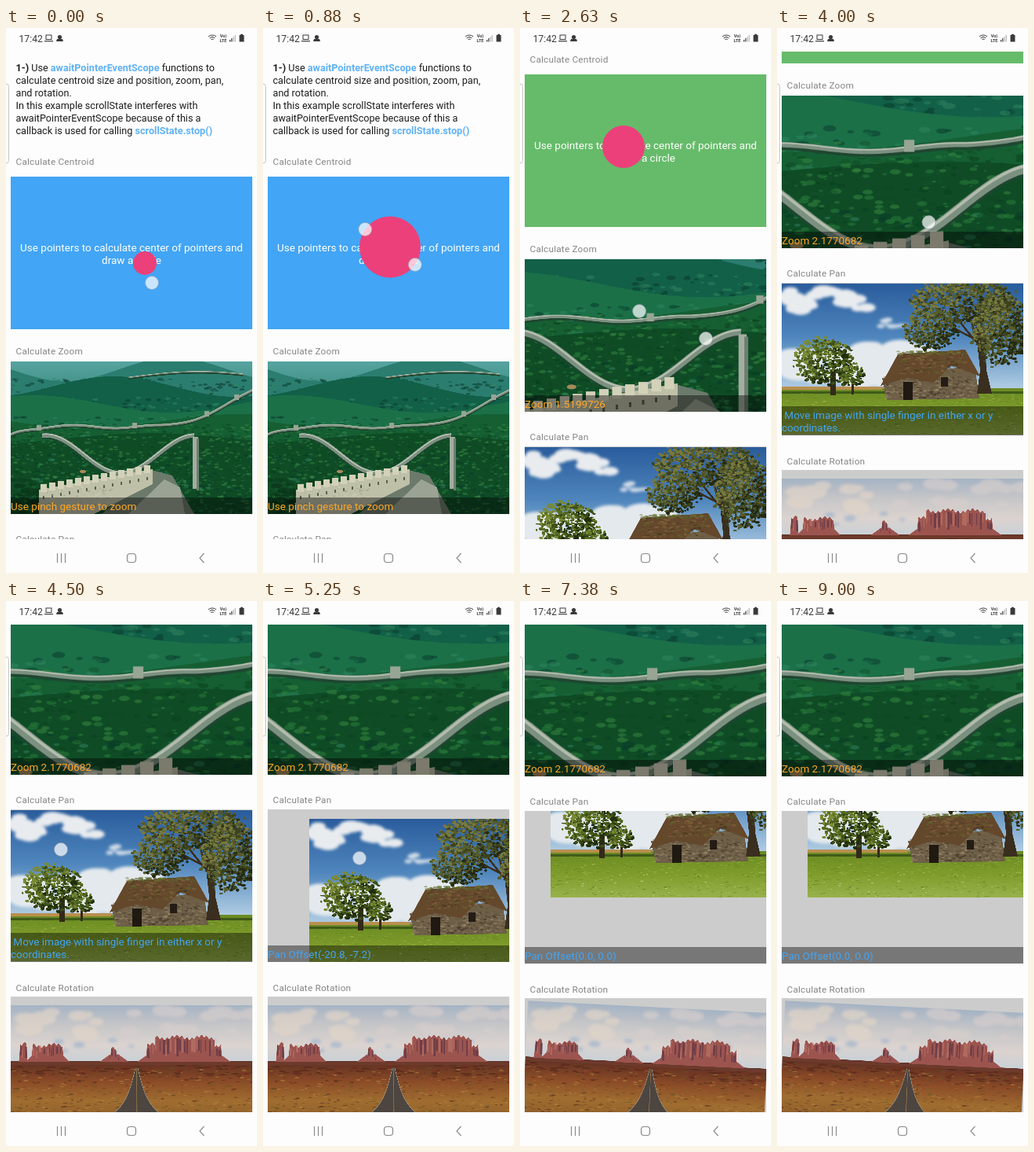
Recreate the animation shown at these times as an HTML page with a canvas. Size 320 px wide and 693 px high, loop 9120 ms.

```html
<!DOCTYPE html>
<html lang="en">
<head>
<meta charset="utf-8">
<title>Pointer gestures</title>
<style>
  html, body { margin: 0; width: 100%; height: 100%; overflow: hidden; background: #fdfdfd; }
  canvas { display: block; width: 320px; height: 693px; }
</style>
</head>
<body>
<canvas id="stage"></canvas>
<script>
const LOOP = 9120, STEP = 125;
const LEFT = 6, W = 308, H = 194;
const DETAIL = 3;
const font = (size, weight = 400) => `${weight} ${size}px Roboto, sans-serif`;
const INTRO = font(12.65), LINK = font(12.65, 700), BODY = font(13.53), LABEL = font(11.8);

const canvas = document.getElementById('stage');
const dpr = window.devicePixelRatio || 1;
canvas.width = 320 * dpr;
canvas.height = 693 * dpr;
const ctx = canvas.getContext('2d');

// ---------- helpers ----------
let seed = 7;
function rnd(min = 0, max = 1) {
  seed = (seed * 1664525 + 1013904223) >>> 0;
  return min + (max - min) * seed / 4294967296;
}

const clamp = v => Math.min(1, Math.max(0, v));
const ramp = (t, from, to) => clamp((t - from) / (to - from));

function picture(h, paint) {
  const c = document.createElement('canvas');
  c.width = W * DETAIL;
  c.height = h * DETAIL;
  const g = c.getContext('2d');
  g.scale(DETAIL, DETAIL);
  paint(g);
  return c;
}

function gradient(g, y0, y1, ...colors) {
  const fill = g.createLinearGradient(0, y0, 0, y1);
  colors.forEach((c, i) => fill.addColorStop(i / (colors.length - 1), c));
  g.fillStyle = fill;
  g.fillRect(0, y0, W, y1 - y0);
}

function rect(g, color, x, y, w, h) {
  g.fillStyle = color;
  g.fillRect(x, y, w, h);
}

function poly(g, color, ...p) {
  g.beginPath();
  for (let i = 0; i < p.length; i += 2) g.lineTo(p[i], p[i + 1]);
  g.fillStyle = color;
  g.fill();
}

function oval(g, color, x, y, rx, ry = rx) {
  g.beginPath();
  g.ellipse(x, y, rx, ry, 0, 0, 7);
  g.fillStyle = color;
  g.fill();
}

// Traces y = f(x); with a floor the area below is filled, else a line is drawn.
function graph(g, color, f, x0, x1, { width = 1, floor } = {}) {
  g.beginPath();
  for (let x = x0; x <= x1; x += 1) g.lineTo(x, f(x));
  if (floor === undefined) {
    g.strokeStyle = color;
    g.lineWidth = width;
    g.stroke();
  } else {
    g.lineTo(x1, floor);
    g.lineTo(x0, floor);
    g.fillStyle = color;
    g.fill();
  }
}

function dabs(g, n, colors, size, x, y, w, h, flat = 0.6) {
  g.globalAlpha = 0.5;
  for (let i = 0; i < n; i++) {
    const r = size * rnd(0.3, 1.3);
    oval(g, colors[i % colors.length], x + rnd() * w, y + rnd() * h, r * 1.3, r * flat);
  }
  g.globalAlpha = 1;
}

// Foliage, lit from the upper left.
function crown(g, x, y, rx, ry, colors) {
  for (let i = 0; i < rx * ry * 0.5; i++) {
    const a = rnd(0, 6.283), d = Math.sqrt(rnd()) * rnd(0.85, 1.1);
    const dx = Math.cos(a) * d, dy = Math.sin(a) * d;
    const shade = clamp(0.5 + (dx + dy) * 0.3 + rnd(-0.45, 0.45));
    oval(g, colors[Math.round(shade * (colors.length - 1))], x + dx * rx, y + dy * ry, rnd(1, 3), rnd(0.8, 2.2));
  }
}

function clouds(g, n, color, x, y, w, h) {
  g.save();
  g.filter = `blur(${2 * DETAIL}px)`;
  g.beginPath();
  for (let i = 0; i < n; i++) {
    const cx = x + rnd() * w, cy = y + rnd() * h, r = h * rnd(0.12, 0.3);
    g.moveTo(cx + r * 2, cy);
    g.ellipse(cx, cy, r * 2, r, 0, 0, 6.283);
  }
  g.fillStyle = color;
  g.fill();
  g.restore();
}

// ---------- pictures ----------
const hills = picture(H, g => {
  gradient(g, 0, 70, '#57a3a0', '#2a7f6a');
  const slopes = ['#2b7d70', '#126048', '#1b7048', '#155f33', '#0f4c26'];
  slopes.forEach((color, i) => {
    const ridge = x => 10 + i * 22 + (15 - i * 2) * Math.sin(x / (44 + i * 6) + i * 2.1);
    graph(g, color, ridge, 0, W, { floor: H });
    dabs(g, 420, ['#07382a', '#2f8560', color], 2.4, 0, 22 + i * 24, W, 42 + i * 10);
  });
  dabs(g, 1500, ['#0a3d1c', '#2c7f3c', '#125228', '#3a8a42', '#0d4721'], 2, 0, 80, W, 114);
  dabs(g, 120, ['#082f16', '#0c3a1a'], 5, 0, 150, 110, 44);

  const wall = (f, x0, x1, width) => {
    graph(g, '#1f4630', x => f(x) + 1.2, x0, x1, { width: width + 1 });
    graph(g, '#7c9080', f, x0, x1, { width });
    graph(g, '#b3bdae', x => f(x) - width * 0.3, x0, x1, { width: width * 0.3 });
  };
  const far = x => 21 - 8 * Math.sin((x - 146) / 60);
  const upper = x => 83 + 2 * Math.sin(x / 17) + 10 * Math.exp(-x / 15) - 45 * clamp((x - 190) / 118) ** 1.5;
  const lower = x => 118 + 24 * Math.cos((x - 140) / 95 * Math.PI);
  wall(far, 150, 296, 1.6);
  wall(upper, 0, W, 3);
  wall(lower, 40, 234, 5.5);
  rect(g, '#a3ada0', 232, 96, 7, 66);
  rect(g, '#6c7f70', 237, 98, 3, 66);
  for (const x of [36, 158, 250, 288]) rect(g, '#97a595', x - 3, upper(x) - 5, 6, 7);

  poly(g, '#6c7a6c', 180, 138, 206, 145, 234, 194, 116, 194);
  poly(g, '#9aa394', 196, 150, 216, 160, 222, 194, 150, 194);
  poly(g, '#bfc0a8', 36, 163, 181, 137, 181, 156, 106, 194, 36, 194);
  for (let x = 38; x < 178; x += 11) {
    const y = 163 - (x - 36) * 0.18;
    rect(g, '#d3d2b9', x, y - 7, 8, 10);
    rect(g, '#59634f', x + 3, y + 8, 2, 4);
  }
  dabs(g, 90, ['#8d937c', '#d8d7c2'], 1.2, 40, 160, 90, 30);
  oval(g, '#a58a58', 92, 140, 4, 2);
});

const cottage = picture(H - 2, g => {
  gradient(g, 0, 136, '#2a5c9c', '#4f86bd', '#b4cfe4');
  clouds(g, 26, '#e9ecef', 0, 8, 110, 26);
  clouds(g, 10, '#d5dfe9', 125, 46, 34, 10);
  clouds(g, 40, '#e4e9ed', 0, 76, 180, 46);
  gradient(g, 133, 192, '#6a8a22', '#7f9c2b', '#98b24c');
  rect(g, '#b98f4e', 0, 131, 128, 4);
  rect(g, '#3f5a1a', 0, 137, W, 3);
  dabs(g, 900, ['#587a1c', '#a4bb55', '#74952a', '#8cab3a'], 1.6, 0, 139, W, 53, 0.3);
  dabs(g, 70, ['#eef0d8'], 0.8, 0, 160, W, 32);

  const leaves = ['#7a8a35', '#576b22', '#3d4f18', '#222f0e'];
  rect(g, '#33291a', 62, 112, 7, 30);
  rect(g, '#33291a', 89, 120, 3, 21);
  crown(g, 54, 98, 38, 29, leaves);
  crown(g, 90, 117, 15, 15, leaves);

  poly(g, '#6e5f48', 128, 120, 246, 104, 252, 146, 134, 148);
  dabs(g, 420, ['#3d3224', '#a08f70', '#5b4d39', '#857455'], 1.7, 129, 118, 118, 28);
  rect(g, '#1f1912', 155, 125, 12, 23);
  rect(g, '#241d15', 203, 119, 9, 12);
  poly(g, '#64482c', 126, 130, 148, 90, 234, 84, 253, 118, 216, 104, 194, 126, 160, 120);
  dabs(g, 260, ['#8a6742', '#47331f', '#6f5433', '#5d6428'], 1.8, 150, 88, 84, 26);
  dabs(g, 70, ['#6d7430', '#54602a'], 2, 148, 86, 88, 4);

  poly(g, '#3a2e1f', 247, 55, 258, 55, 261, 110, 268, 140, 249, 140, 253, 110);
  for (let i = -3; i <= 3; i++) {
    g.beginPath();
    g.moveTo(254, 92 - Math.abs(i) * 6);
    g.quadraticCurveTo(254 + i * 9, 62, 254 + i * 17, 22 + Math.abs(i) * 8);
    g.strokeStyle = '#3a2e1f';
    g.lineWidth = 2.5;
    g.stroke();
  }
  const dryLeaves = ['#77793f', '#565c2c', '#3c431f', '#242a13'];
  crown(g, 232, 22, 66, 28, dryLeaves);
  crown(g, 190, 58, 34, 26, dryLeaves);
  crown(g, 279, 58, 36, 46, dryLeaves);
});

const desert = picture(172, g => {
  gradient(g, 0, 76, '#a5b3c4', '#c6c6c8', '#dbd3cf', '#c6d0d8');
  clouds(g, 16, 'rgba(226,212,200,.7)', 0, 8, 130, 30);
  clouds(g, 14, 'rgba(214,206,204,.7)', 140, 6, 168, 28);
  clouds(g, 8, 'rgba(150,175,205,.6)', 30, 44, 260, 14);
  gradient(g, 71, 172, '#5c3023', '#8a4a27', '#a06d30', '#8c5e2a', '#6b4225');
  dabs(g, 900, ['#4a2819', '#b98a40', '#7d4423', '#6a5a28'], 2, 0, 80, W, 92, 0.35);
  dabs(g, 160, ['#7a3420', '#4d2218'], 4, 0, 74, W, 16, 0.25);

  // A flat-topped rock with ragged sides standing on a sloping foot.
  const butte = (x0, x1, top, foot) => {
    const rock = x => {
      const inset = Math.min(x - x0, x1 - x);
      return inset < foot ? 73 - inset * 10 / foot : top + 2 * Math.sin(x / 5) + 1.5 * Math.sin(x);
    };
    graph(g, '#9c544f', rock, x0, x1, { floor: 74 });
    for (let x = x0 + foot; x < x1 - foot; x += rnd(2, 6)) {
      const y = rock(x);
      rect(g, rnd() < 0.6 ? 'rgba(74,44,66,.55)' : 'rgba(198,128,112,.5)', x, y + rnd(0, 6), rnd(1, 3), (66 - y) * rnd(0.5, 0.9));
    }
  };
  butte(10, 22, 49, 2);
  butte(18, 76, 51, 10);
  butte(112, 152, 62, 14);
  butte(126, 136, 53, 2);
  butte(160, 282, 51, 14);
  butte(180, 264, 41, 4);
  rect(g, '#6d3a2c', 0, 72, W, 4);

  const halfWidth = y => {
    const u = (y - 79) / 57;
    return 0.8 + 14 * u + 12 * u ** 4;
  };
  g.beginPath();
  for (let y = 79; y <= 172; y++) g.lineTo(160 - halfWidth(y), y);
  for (let y = 172; y >= 79; y--) g.lineTo(161 + halfWidth(y), y);
  g.fillStyle = '#4c4540';
  g.fill();
  g.strokeStyle = '#a89b8a';
  g.lineWidth = 0.6;
  g.stroke();
  poly(g, '#8f7240', 160.3, 80, 160.7, 80, 162, 172, 160.5, 172);
});

// ---------- screen parts ----------
function text(str, x, y, color, face = BODY, align = 'left') {
  ctx.font = face;
  ctx.letterSpacing = face === LABEL ? '0.2px' : '0px';
  ctx.textAlign = align;
  ctx.fillStyle = color;
  ctx.fillText(str, x, y);
  return x + ctx.measureText(str).width;
}

function line(color, width, ...p) {
  ctx.beginPath();
  for (let i = 0; i < p.length; i += 2) ctx.lineTo(p[i], p[i + 1]);
  ctx.strokeStyle = color;
  ctx.lineWidth = width;
  ctx.stroke();
}

function touch(x, y) {
  oval(ctx, 'rgba(255,255,255,.72)', x, y, 8.5);
  ctx.strokeStyle = 'rgba(150,155,175,.6)';
  ctx.lineWidth = 1;
  ctx.stroke();
}

function touchPair(x, y, r, angle) {
  const dx = r * Math.cos(angle), dy = r * Math.sin(angle);
  touch(x - dx, y - dy);
  touch(x + dx, y + dy);
}

// Clipped panel; paint draws with the origin at the panel's top left.
function panel(y, color, paint) {
  ctx.save();
  ctx.translate(LEFT, y);
  ctx.beginPath();
  ctx.rect(0, 0, W, H);
  ctx.clip();
  rect(ctx, color, 0, 0, W, H);
  paint();
  ctx.restore();
}

function caption(color, ...lines) {
  const h = 5 + 16 * lines.length;
  rect(ctx, 'rgba(0,0,0,.42)', 0, H - h, W, h);
  lines.forEach((str, i) => text(str, 0, H - 5.5 - 16 * (lines.length - 1 - i), color));
}

function intro() {
  const ink = '#1c1c1c', blue = '#5fb2f5';
  let x = text('1-)', 12.5, 54.5, ink, LINK);
  x = text(' Use ', x, 54.5, ink, INTRO);
  x = text('awaitPointerEventScope', x, 54.5, blue, LINK);
  text(' functions to', x, 54.5, ink, INTRO);
  ['calculate centroid size and position, zoom, pan,', 'and rotation.',
   'In this example scrollState interferes with', 'awaitPointerEventScope because of this a',
   'callback is used for calling '].forEach((str, i) => {
    x = text(str, 12.5, 70.5 + 16 * i, ink, INTRO);
  });
  text('scrollState.stop()', x, 134.5, blue, LINK);
}

function centroidPanel(t) {
  const moved = ramp(t, 0, 1375);
  const swing = Math.sin(moved * Math.PI);
  const x = 171 - 45 * moved + 15 * swing, y = 110 - 18 * moved - 10 * swing;
  const r = 15 + 12 * moved + 18 * swing;
  panel(189, t < 1500 ? '#42a5f5' : '#66bb6a', () => {
    text('Use pointers to calculate center of pointers and', W / 2, 94.5, '#fff', BODY, 'center');
    text('draw a circle', W / 2, 110.5, '#fff', BODY, 'center');
    oval(ctx, '#ec407a', x, y, r);
  });
  if (t < 250) touch(LEFT + x + 9, 189 + y + 25);
  else if (t < 1375) touchPair(LEFT + x, 189 + y, r, 1.2 - t / 1500);
}

function zoomPanel(t) {
  const zoom = 1 + 0.5199726 * ramp(t, 2250, 2625) + 0.6570956 * ramp(t, 2625, 3000);
  panel(424, '#ccc', () => {
    ctx.save();
    ctx.translate(W / 2, H / 2);
    ctx.scale(zoom, zoom);
    ctx.drawImage(hills, -W / 2, -H / 2, W, H);
    ctx.restore();
    caption('#ffa726', t <= 2250 ? 'Use pinch gesture to zoom' : 'Zoom ' + zoom.toFixed(7));
  });
  if (t >= 2250 && t <= 3000) touchPair(194.5, 507.5, 30.2 * zoom, 0.39);
}

function panPanel(t) {
  const at = time => {
    const out = ramp(time, 4500, 5000), back = ramp(time, 5000, 5250), up = ramp(time, 5250, 5750);
    return [78 * out - 25 * back - 20 * up, 19.65 * out - 8.65 * back - 94 * up];
  };
  const [x, y] = at(t), [lastX, lastY] = at(t - STEP);
  const change = d => (d * 1.664).toFixed(1);
  panel(662, '#ccc', () => {
    ctx.drawImage(cottage, x, y + 1, W, H - 2);
    if (t <= 4500) caption('#42a5f5', ' Move image with single finger in either x or y', 'coordinates.');
    else caption('#42a5f5', `Pan Offset(${change(x - lastX)}, ${change(y - lastY)})`);
  });
  if (t >= 4500 && t < 5750) touch(70 + x, 713 + y);
}

function rotationPanel(t) {
  const degrees = 163.3 * ramp(t, 6000, 6500) + 199.6 * ramp(t, 6500, 7375);
  const angle = degrees * Math.PI / 180;
  panel(900, '#ccc', () => {
    ctx.translate(W / 2, H / 2);
    ctx.rotate(angle);
    ctx.drawImage(desert, -W / 2, -86, W, 172);
  });
  if (t >= 6000 && t < 7375) touchPair(151.5, 945.5, 50.6, angle);
}

function statusBar() {
  const ink = '#3a3a3a';
  text('17:42', 16.5, 17.5, ink, font(12.2));
  ctx.strokeStyle = ink;
  ctx.lineWidth = 1;
  ctx.strokeRect(51, 9, 7, 5.5);
  line(ink, 1.2, 49, 16.7, 60, 16.7);
  oval(ctx, ink, 68.5, 11.5, 2.6);
  poly(ctx, ink, 64, 17, 65, 14, 72, 14, 73, 17);

  for (const r of [2.5, 5, 7.5]) {
    ctx.beginPath();
    ctx.arc(263, 16.5, r, -2.3, -0.84);
    ctx.strokeStyle = ink;
    ctx.lineWidth = 1;
    ctx.stroke();
  }
  text('Vo)', 277, 12, ink, font(5.5, 700), 'center');
  text('LTE', 277, 17.5, ink, font(5.5, 700), 'center');
  for (let i = 0; i < 4; i++) rect(ctx, i < 2 ? ink : '#b5b5b5', 285 + i * 2.2, 15 - i * 2, 1.2, 2.5 + i * 2);
  rect(ctx, ink, 297.5, 9, 6, 8.5);
  rect(ctx, ink, 299, 7.8, 3, 2);
}

function navigationBar() {
  const ink = '#8a8a8a';
  for (let i = -1; i <= 1; i++) line(ink, 1.2, 70.5 + i * 5, 668, 70.5 + i * 5, 680);
  ctx.beginPath();
  ctx.roundRect(154.5, 668.5, 11, 11, 3.5);
  ctx.stroke();
  line(ink, 1.2, 252.5, 668, 247, 674, 252.5, 680);
}

function edgeHandle() {
  ctx.beginPath();
  ctx.roundRect(-6, 71, 9.5, 101, 3.5);
  ctx.fillStyle = '#fff';
  ctx.fill();
  ctx.strokeStyle = '#c4c4c4';
  ctx.lineWidth = 1;
  ctx.stroke();
}

const drags = [
  { from: 1750, to: 2125, by: 130, x: 163.5, y: 398 },
  { from: 3125, to: 3625, by: 208, x: 200, y: 450 },
  { from: 4000, to: 4375, by: 59, x: 193.5, y: 247 },
];

function draw(t) {
  ctx.setTransform(dpr, 0, 0, dpr, 0, 0);
  rect(ctx, '#fdfdfd', 0, 0, 320, 693);

  let scroll = -2 * ramp(t, 5625, 5875);
  for (const d of drags) scroll += d.by * ramp(t, d.from, d.to);

  ctx.save();
  ctx.beginPath();
  ctx.rect(0, 30, 320, 620);
  ctx.clip();
  ctx.translate(0, -scroll);
  intro();
  ['Centroid', 'Zoom', 'Pan', 'Rotation'].forEach((name, i) =>
    text('Calculate ' + name, 12.5, 173.5 + i * 239 + (i ? 2 : 0), '#858585', LABEL));
  centroidPanel(t);
  zoomPanel(t);
  panPanel(t);
  rotationPanel(t);
  ctx.restore();

  for (const d of drags)
    if (t >= d.from - STEP && t < d.to) touch(d.x, d.y - d.by * ramp(t, d.from, d.to));
  statusBar();
  navigationBar();
  edgeHandle();
}

// Each pose is held for an eighth of a second, on a 10 ms clock.
function heldTime(t) {
  let i = Math.floor(t / STEP);
  if (t < 10 * Math.round(i * STEP / 10)) i--;
  return Math.min(i, 72) * STEP;
}

const start = performance.now();
function frame() {
  draw(heldTime((performance.now() - start) % LOOP));
  requestAnimationFrame(frame);
}
frame();
</script>
</body>
</html>
```
